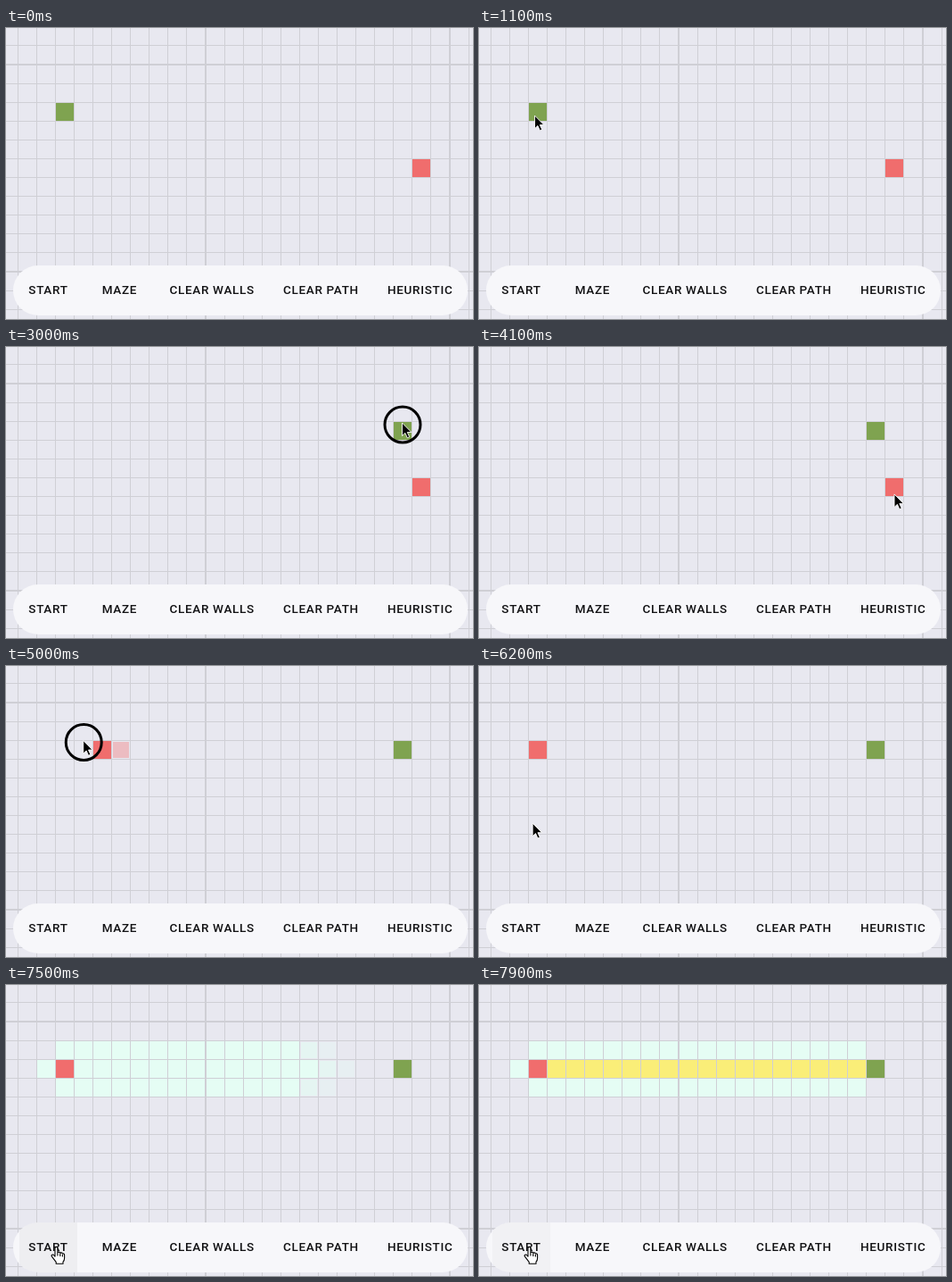
Recreate the animation shown at these times as an HTML page. Size 524 px wide and 326 px high, loop 8 s.

```html
<!DOCTYPE html>
<html lang="en">
<head>
<meta charset="utf-8">
<title>Pathfinding grid</title>
<style>
html, body { margin: 0; width: 100%; height: 100%; overflow: hidden; background: #e8e8f0; }
svg { display: block; }
text { font: 500 13.5px Roboto, Arial, sans-serif; letter-spacing: .68px; fill: #121214; }
#cells rect { transform-box: fill-box; transform-origin: center; }
</style>
</head>
<body>
<svg width="524" height="326" viewBox="0 0 524 326">
  <rect width="524" height="326" fill="#e8e8f0"/>
  <g id="cells" shape-rendering="crispEdges"></g>
  <g id="lines" fill="#cfcfd5" shape-rendering="crispEdges"></g>
  <clipPath id="pill"><rect x="8" y="266" width="510" height="56" rx="28"/></clipPath>
  <rect x="8" y="266" width="510" height="56" rx="28" fill="#f7f7fa"/>
  <rect id="hover" x="15" y="266" width="65" height="56" clip-path="url(#pill)"/>
  <g id="labels"></g>
  <g id="pointer">
    <circle id="ring" cx=".5" cy="2" r="20" fill="none" stroke="#000" stroke-width="3"/>
    <path id="arrow" d="M0 0V14.6L3.4 11.4L5.8 16.8L8.2 15.7L5.8 10.5H10.4Z" fill="#000" stroke="#fff" stroke-width=".9"/>
    <path id="hand" d="M0 2Q0 .4 1.4 .4T2.9 2V7Q3.2 6 4.4 6.1T5.8 7.4Q6.2 6.7 7.2 6.9T8.4 8.2Q9 7.6 9.8 8T10.6 9.5V13Q10.6 15.5 9 17.2V19.2H1.2V17.4L-3.6 11.2Q-4.4 9.8 -3.2 9.2T-1 10L0 11.2ZM2.9 7V10.5M5.8 8V11M8.4 9V11.5" fill="#fff" stroke="#000" stroke-width="1.1" stroke-linejoin="round"/>
  </g>
</svg>
<script>
const LOOP = 8000, RED = '#f06d6d', GREEN = '#7fa350', MINT = '#e5fdf4', YELLOW = '#faee78';
const $ = id => document.getElementById(id);
const set = (id, attr, value) => $(id).setAttribute(attr, value);
const clamp = v => Math.max(0, Math.min(1, v));
const ramp = (t, start, span) => clamp((t - start) / span);
const within = (t, a, b) => t >= a && t < b;

function add(parent, tag, attrs) {
  const el = document.createElementNS('http://www.w3.org/2000/svg', tag);
  for (const k in attrs) el.setAttribute(k, attrs[k]);
  return $(parent).appendChild(el);
}

// Lines every 21 px; the "wide" ones take one pixel more
const axis = (start, wide) => ({
  at: i => start + 21 * i + wide.filter(w => w < i).length,
  width: i => wide.includes(i) ? 2 : 1
});
const cols = axis(13, [10, 23]), rows = axis(19, [1, 12]);

for (let i = 0; i < 25; i++)
  add('lines', 'rect', { x: cols.at(i), y: 0, width: cols.width(i), height: 326 });
for (let j = 0; j < 15; j++)
  add('lines', 'rect', { x: 0, y: rows.at(j), width: 524, height: rows.width(j) });

const labels = { START: 25.3, MAZE: 107.7, 'CLEAR WALLS': 183.5, 'CLEAR PATH': 311, HEURISTIC: 428 };
for (const s in labels) add('labels', 'text', { x: labels[s], y: 297.8 }).textContent = s;

// Pointer moves: start, end, x, y
const entry = [38, 322];
const moves = [
  [800, 1400, 66, 91],
  [2000, 2800, 444.5, 85],
  [3500, 3900, 466, 165],
  [4100, 4300, 466, 161],
  [4500, 5320, 63, 82.8],
  [6100, 7000, 53.5, 291],
  [7100, 7200, 55, 293]
];

// Every move slows down; height settles sooner than width
function tip(t) {
  let [x, y] = entry;
  for (const [start, end, toX, toY] of moves) {
    const left = 1 - ramp(t, start, end - start);
    x = toX + (x - toX) * left ** 3;
    y = toY + (y - toY) * left ** 5;
  }
  return [x, y];
}

function indexAt(line, v) {
  let i = 0;
  while (line.at(i + 1) <= v) i++;
  return i;
}
const cellAt = ([x, y]) => [indexAt(cols, x), indexAt(rows, y)];

const pool = new Map();
let live;
function paint(i, j, fill, alpha = 1) {
  if (alpha <= 0) return;
  const key = [i, j, fill].join();
  if (!pool.has(key)) {
    const x = cols.at(i) + cols.width(i), y = rows.at(j) + rows.width(j);
    pool.set(key, add('cells', 'rect', { x, y, width: cols.at(i + 1) - x, height: rows.at(j + 1) - y, fill }));
  }
  const el = pool.get(key);
  el.setAttribute('opacity', alpha);
  el.style.transform = `scale(${.84 + .16 * alpha})`;
  live.add(key);
}

// A dragged square follows the pointer and leaves a short fading trail
function dragged(t, from, to, home, goal, color) {
  if (t < from) return paint(...home, color);
  if (t >= to) return paint(...goal, color);
  const seen = new Set();
  for (let d = 42; d < 140; d += 4) {
    const cell = cellAt(tip(Math.max(from, t - d))), key = cell.join();
    if (!seen.has(key)) paint(...cell, color, 1 - (d - 42) / 100);
    seen.add(key);
  }
}

// Three rows spread from the red square, then the path fills in
function search(t) {
  const visit = (i, j, n) => paint(i, j, MINT, ramp(t, 7200 + n * 20, 60));
  visit(1, 3, 0);
  for (let n = 0; n < 18; n++) {
    visit(2 + n, 2, n);
    visit(2 + n, 4, n);
    if (!n) continue;
    visit(2 + n, 3, n - 1);
    paint(2 + n, 3, YELLOW, ramp(t, 7620 + n * 11, 60));
  }
}

function draw(t) {
  live = new Set();
  search(t);
  dragged(t, 1900, 3100, [2, 3], [20, 3], GREEN);
  dragged(t, 4400, 5600, [21, 6], [2, 3], RED);
  for (const [key, el] of pool) el.setAttribute('visibility', live.has(key) ? 'visible' : 'hidden');

  const hand = t >= 7200;
  const down = within(t, 1600, 3300) || within(t, 4200, 5700) || within(t, 7100, 7300);
  set('pointer', 'transform', `translate(${tip(t)})`);
  set('pointer', 'visibility', t < 800 ? 'hidden' : 'visible');
  set('arrow', 'opacity', +!hand);
  set('hand', 'opacity', +hand);
  set('ring', 'opacity', +down);

  const passing = ramp(t, 800, 50) * (1 - ramp(t, 900, 200));
  const resting = ramp(t, 6400, 200) * (1 - .4 * ramp(t, 7300, 400));
  set('hover', 'opacity', .042 * Math.max(passing, resting));
}

const begin = performance.now();
function tick() {
  draw((performance.now() - begin) % LOOP);
  requestAnimationFrame(tick);
}
tick();
</script>
</body>
</html>
```
